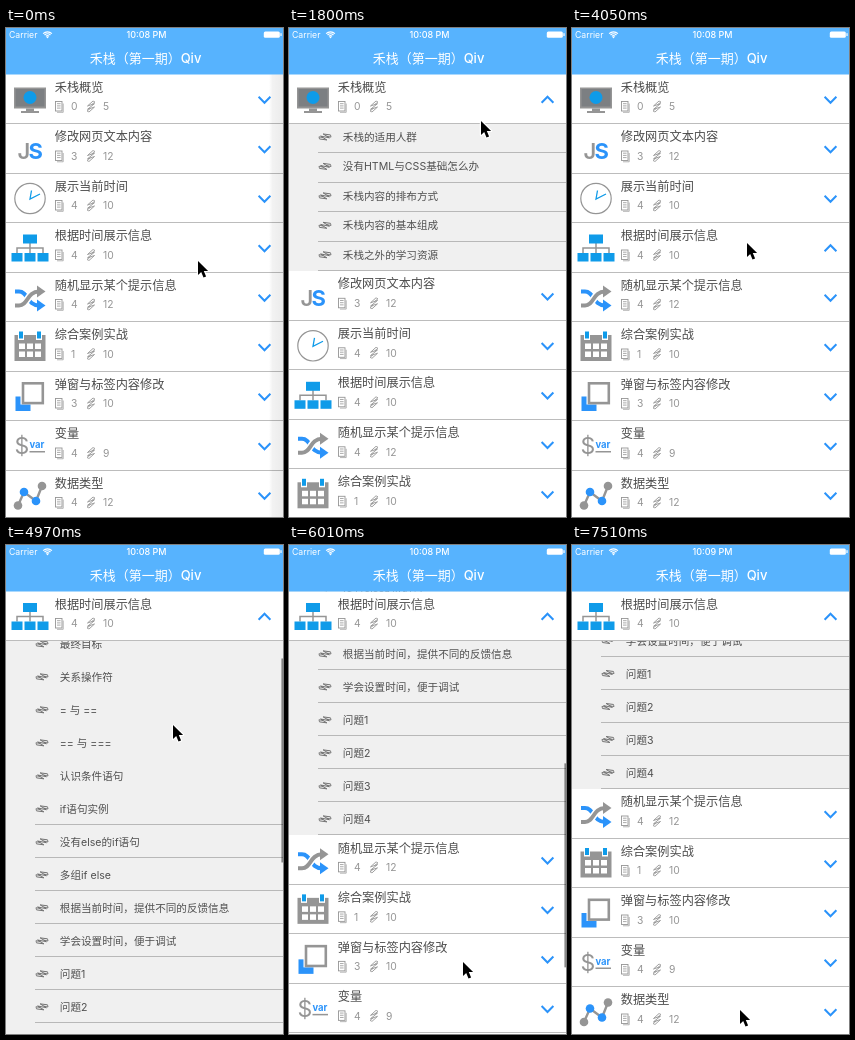
These frames come from a looping animation (277 px wide and 489 px high, 8 s). An HTML page with a canvas:

```html
<!DOCTYPE html>
<html lang="zh-CN">
<head>
<meta charset="utf-8">
<style>
html, body { margin: 0; width: 100%; height: 100%; overflow: hidden; background: #fff; }
canvas { display: block; width: 277px; height: 489px; }
</style>
</head>
<body>
<canvas id="stage"></canvas>
<script>
const W = 277, H = 489, LOOP = 8000;
const TOP = 46.5, ROW = 49.5, CELL = 33;
const BLUE = '#2b93fa', SKY = '#0f9be9', GREY = '#959595';
const FONT = 'Inter, "Noto Sans CJK SC", "Noto Sans CJK", sans-serif';

const canvas = document.getElementById('stage');
const c = canvas.getContext('2d');
const dpr = window.devicePixelRatio || 1;
canvas.width = W * dpr;
canvas.height = H * dpr;

const sections = [
  { title: '禾栈概览', counts: [0, 5], items: ['禾栈的适用人群', '没有HTML与CSS基础怎么办',
    '禾栈内容的排布方式', '禾栈内容的基本组成', '禾栈之外的学习资源'], plain: 0 },
  { title: '修改网页文本内容', counts: [3, 12] },
  { title: '展示当前时间', counts: [4, 10] },
  { title: '根据时间展示信息', counts: [4, 10], items: ['最终目标', '关系操作符', '= 与 ==',
    '== 与 ===', '认识条件语句', 'if语句实例', '没有else的if语句', '多组if else',
    '根据当前时间，提供不同的反馈信息', '学会设置时间，便于调试',
    '问题1', '问题2', '问题3', '问题4'], plain: 5 },
  { title: '随机显示某个提示信息', counts: [4, 12] },
  { title: '综合案例实战', counts: [1, 10] },
  { title: '弹窗与标签内容修改', counts: [3, 10] },
  { title: '变量', counts: [4, 9] },
  { title: '数据类型', counts: [4, 12] }
];

const cursorPath = [
  [50, 192, 233], [510, 192, 93], [3040, 192, 93], [3580, 175, 215],
  [4690, 175, 215], [4970, 167, 180], [5540, 167, 180], [6010, 174, 417],
  [6350, 174, 417], [7100, 172, 440], [7160, 172, 440], [7510, 168, 465]
];

// Motion helpers
const part = (t, a, b) => Math.min(1, Math.max(0, (t - a) / (b - a)));
const smooth = (t, a, b) => { const u = part(t, a, b); return u * u * (3 - 2 * u); };
const glide = (t, a, b) => 1 - (1 - part(t, a, b)) ** 2;

function cursorAt(t) {
  let [, x, y] = cursorPath[0];
  for (let i = 1; i < cursorPath.length; i++) {
    const a = cursorPath[i - 1], b = cursorPath[i], u = smooth(t, a[0], b[0]);
    x += (b[1] - a[1]) * u;
    y += (b[2] - a[2]) * u;
  }
  return [x, y];
}

const scrollAt = t => 280 * glide(t, 4690, 5490) + 158 * glide(t, 5540, 6290) + 24.5 * glide(t, 6350, 7100);

function openAt(i, t) {
  if (i === 0) return smooth(t, 1570, 1860) - smooth(t, 2746, 3046);
  return i === 3 ? smooth(t, 4170, 4450) : 0;
}

function turnAt(i, t) {
  if (i === 0) return smooth(t, 1220, 1450) - smooth(t, 2340, 2570);
  return i === 3 ? smooth(t, 3810, 4040) : 0;
}

// Drawing helpers
function rect(x, y, w, h, color) {
  c.fillStyle = color;
  c.fillRect(x, y, w, h);
}

function text(s, x, y, size, color, weight = 400, align = 'left') {
  c.font = `${weight} ${size}px ${FONT}`;
  c.fillStyle = color;
  c.textAlign = align;
  c.textBaseline = 'alphabetic';
  c.fillText(s, x, y);
}

function line(points, color, width) {
  c.beginPath();
  points.forEach(([x, y]) => c.lineTo(x, y));
  c.strokeStyle = color;
  c.lineWidth = width;
  c.stroke();
}

function shape(points, color) {
  c.beginPath();
  points.forEach(([x, y]) => c.lineTo(x, y));
  c.closePath();
  c.fillStyle = color;
  c.fill();
}

function dot(x, y, r, color) {
  c.beginPath();
  c.arc(x, y, r, 0, 7);
  c.fillStyle = color;
  c.fill();
}

function at(x, y, angle, draw) {
  c.save();
  c.translate(x, y);
  c.rotate(angle);
  draw();
  c.restore();
}

function bolt(x, y, angle, color) {
  at(x, y, angle, () => {
    c.lineJoin = 'round';
    line([[2, -5.5], [-3.5, -0.5], [3.5, -2.8], [-3.5, 2.8], [3.5, 0.5], [-2, 5.5]], color, 0.9);
    line([[2, -5.5], [4, -4.5], [0.5, -1.8]], color, 0.8);
    line([[-0.5, 1.8], [-4, 4.5], [-2, 5.5]], color, 0.8);
  });
}

function sheet(x, y) {
  c.strokeStyle = GREY;
  c.lineWidth = 0.9;
  c.strokeRect(x + 0.5, y - 5, 6.5, 9.5);
  for (const d of [-2.8, -0.6, 1.6]) line([[x + 2, y + d], [x + 5.6, y + d]], GREY, 0.8);
  line([[x + 2, y + 5.8], [x + 8.2, y + 5.8], [x + 8.2, y - 3]], GREY, 0.7);
}

// Row icons, placed from the row's top left corner
const icons = [
  () => {
    rect(8, 13, 32, 21, GREY);
    rect(9.5, 14.5, 29, 17.5, '#7c7f82');
    dot(24, 23, 6.5, SKY);
    rect(20, 34, 8, 3, GREY);
    rect(15, 36.5, 18, 2, GREY);
  },
  () => {
    text('J', 11.5, 35, 22, GREY, 600);
    text('S', 22.5, 35, 22, BLUE, 700);
  },
  () => {
    c.beginPath();
    c.arc(24, 25, 15.2, 0, 7);
    c.strokeStyle = GREY;
    c.lineWidth = 1.2;
    c.stroke();
    line([[25.5, 17], [24, 25.5], [34, 20.5]], SKY, 1.3);
  },
  () => {
    line([[24, 20], [24, 30]], GREY, 1.5);
    line([[11, 30], [11, 25], [37, 25], [37, 30]], GREY, 1.5);
    rect(17, 11.5, 14, 9, SKY);
    for (const x of [5.5, 18.5, 31.5]) rect(x, 30, 11, 8.5, SKY);
  },
  () => {
    const wave = (y1, y2, color) => {
      c.beginPath();
      c.moveTo(9, y1);
      c.lineTo(13, y1);
      c.bezierCurveTo(22, y1, 21, y2, 33, y2);
      for (const [w, paint] of [[7, '#fff'], [4, color]]) {
        c.strokeStyle = paint;
        c.lineWidth = w;
        c.stroke();
      }
      shape([[31, y2 - 6], [39.5, y2], [31, y2 + 6]], color);
    };
    wave(19, 33, BLUE);
    wave(33, 19, GREY);
  },
  () => {
    rect(8.5, 13, 31, 26, GREY);
    for (const x of [13, 31]) {
      rect(x - 1, 9, 6, 9, '#fff');
      rect(x, 9.5, 4, 7, SKY);
    }
    for (let i = 0; i < 6; i++) rect(13 + (i % 3) * 8, 21.5 + Math.floor(i / 3) * 8, 6, 5.5, '#fff');
  },
  () => {
    rect(9.5, 25, 15, 14.5, BLUE);
    rect(14.5, 9.5, 24, 23.5, '#fff');
    c.strokeStyle = GREY;
    c.lineWidth = 2.6;
    c.strokeRect(17, 11.8, 19.8, 19.8);
  },
  () => {
    text('$', 8.5, 33, 23, GREY);
    text('var', 23.5, 27, 9.5, BLUE, 700);
    rect(23.5, 30, 15.5, 1.5, GREY);
  },
  () => {
    const nodes = [[12, 35], [18, 21.5], [30, 30.5], [36, 15.5]];
    line(nodes, GREY, 2.4);
    nodes.forEach(([x, y], i) => dot(x, y, 4.3, i === 1 || i === 2 ? BLUE : GREY));
  }
];

function drawRow(i, y, t) {
  const { title, counts } = sections[i];
  const top = Math.round(y), bottom = Math.round(y + ROW);
  rect(0, top, W, bottom - top, '#fff');
  c.save();
  c.translate(0, y);
  icons[i]();
  text(title, 48.7, 17.2, 12.2, '#4c4c4c');
  sheet(49, 32);
  text(counts[0], 65, 35.8, 10.3, GREY);
  bolt(85, 32, 0, GREY);
  text(counts[1], 97, 35.8, 10.3, GREY);
  at(258.5, 25.2, Math.PI * turnAt(i, t), () => line([[-5.9, -3], [0, 3], [5.9, -3]], BLUE, 2));
  c.restore();
  rect(0, bottom - 1, W, 1, '#bcbcbc');
}

function drawItem(s, y, h, ruled) {
  c.save();
  c.beginPath();
  c.rect(0, y, W, h);
  c.clip();
  const mid = y + h - 16.5;
  bolt(36, mid, 0.87, '#707070');
  text(s, 53.8, mid + 4, 10.6, '#505050');
  c.restore();
  if (ruled && h > 1) rect(29, Math.round(y + h) - 1, W - 29, 1, '#b8b8b8');
}

function drawList(t) {
  c.save();
  c.beginPath();
  c.rect(0, TOP, W, H);
  c.clip();
  let y = TOP - scrollAt(t);
  sections.forEach((s, i) => {
    const h = CELL * openAt(i, t), items = s.items || [];
    const end = y + ROW + h * items.length;
    if (h > 0.01) {
      rect(0, y + ROW, W, end - y - ROW, '#f0f0f0');
      items.forEach((name, k) => {
        const iy = y + ROW + k * h;
        if (iy < H && iy + h > TOP) drawItem(name, iy, h, k >= s.plain);
      });
    }
    // The current section's row stays pinned below the title bar
    const head = Math.min(Math.max(y, TOP), end - ROW);
    if (head < H && head + ROW > TOP) drawRow(i, head, t);
    y = end;
  });
  c.restore();
}

function drawBar(t) {
  rect(0, 0, W, TOP, '#57b3fe');
  text('Carrier', 3, 9.8, 8.7, '#fff');
  text(t < 7400 ? '10:08 PM' : '10:09 PM', 140.5, 9.8, 9, '#fff', 500, 'center');
  c.strokeStyle = '#fff';
  c.lineWidth = 1.2;
  for (const r of [2.2, 4.2, 6.2]) {
    c.beginPath();
    c.arc(41.5, 10, r, -Math.PI * 0.75, -Math.PI * 0.25);
    c.stroke();
  }
  dot(41.5, 9.3, 0.9, '#fff');
  c.beginPath();
  c.roundRect(257.8, 3.4, 16, 6.4, 1.5);
  c.fillStyle = '#fff';
  c.fill();
  rect(274.4, 5.2, 1.2, 2.8, '#fff');
  text('禾栈（第一期）Qiv', 139.5, 34.8, 13, '#fff', 500, 'center');
}

function drawThumb(t) {
  const alpha = t < 4690 ? 0 : 1 - part(t, 7160, 7400);
  if (alpha) rect(275.4, TOP + 0.413 * scrollAt(t), 1.6, 204, `rgba(0,0,0,${0.46 * alpha})`);
}

function drawEdge(t) {
  if (t >= 1110) return;
  const g = c.createLinearGradient(263, 0, W, 0);
  g.addColorStop(0, 'rgba(0,0,0,0)');
  g.addColorStop(0.25, 'rgba(0,0,0,.05)');
  g.addColorStop(1, 'rgba(0,0,0,.08)');
  rect(263, TOP, W - 263, H - TOP, g);
}

function drawCursor(t) {
  const [x, y] = cursorAt(t);
  at(x - 0.5, y - 0.5, 0, () => {
    const arrow = [[0.5, 0.5], [0.5, 14.5], [3.7, 11.6], [6, 17], [8.6, 15.9], [6.3, 10.6], [10.6, 10.4]];
    c.lineJoin = 'round';
    line([...arrow, arrow[0]], '#fff', 2.4);
    shape(arrow, '#000');
  });
}

function frame(now) {
  const t = now % LOOP;
  c.setTransform(dpr, 0, 0, dpr, 0, 0);
  rect(0, 0, W, H, '#fff');
  drawList(t);
  drawBar(t);
  drawEdge(t);
  drawThumb(t);
  drawCursor(t);
}

const start = performance.now();
function tick() {
  frame(performance.now() - start);
  requestAnimationFrame(tick);
}
tick();
</script>
</body>
</html>
```
